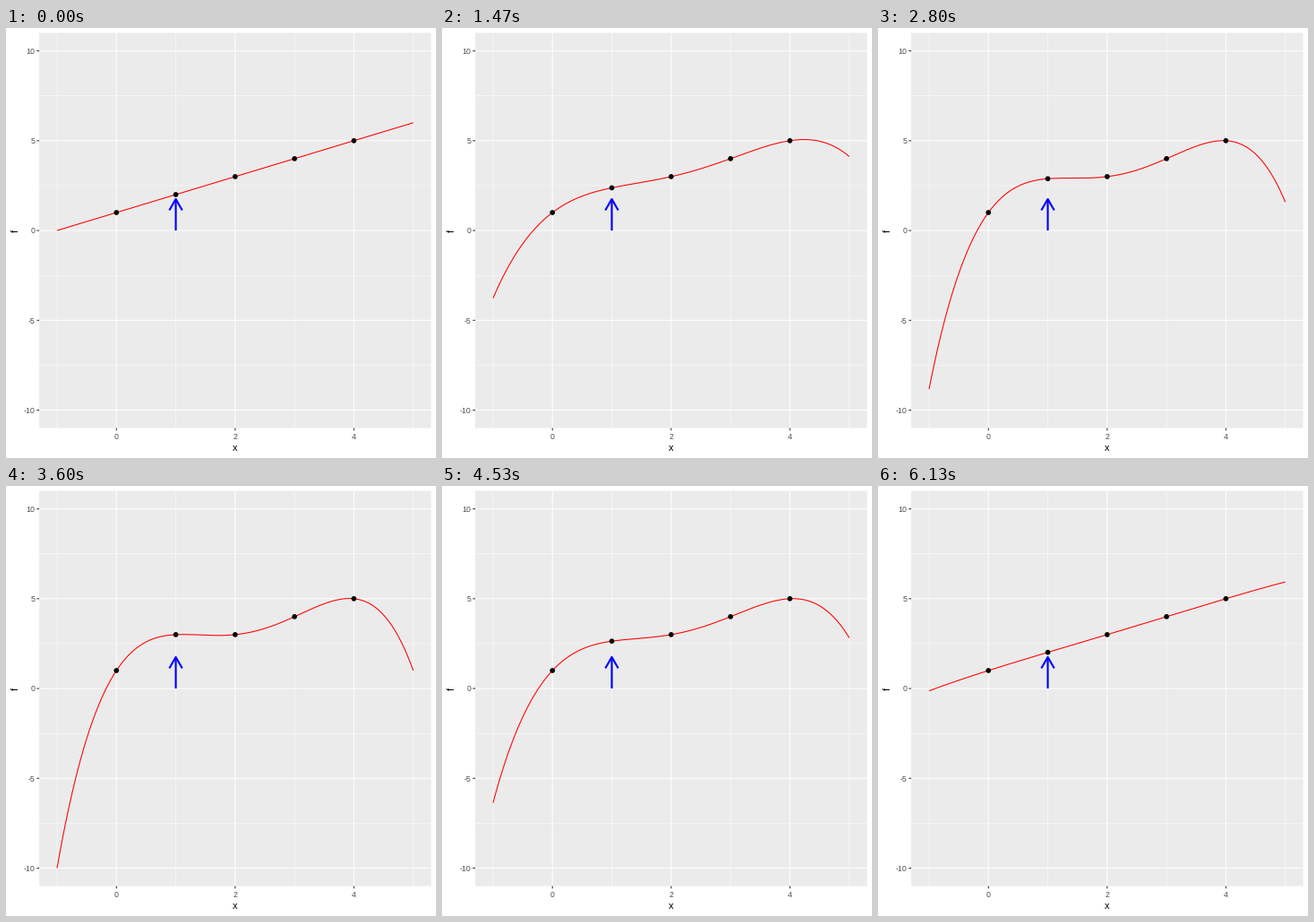
A matplotlib script for the animation above (6.67 s loop, 480 px wide and 480 px high).

```python
import numpy as np
import matplotlib.pyplot as plt
from matplotlib.animation import FuncAnimation
from matplotlib.patches import Circle, Rectangle

SIZE, DPI = 480, 100
FRAMES, LOOP_MS = 200, 6670
LEFT, RIGHT, TOP, BOTTOM = 37.1, 474.5, 5.5, 446.6
RISE_FROM, FALL_FROM, MOVE = 15, 107, 77
PT = 72 / DPI  # points per pixel

plt.rcParams["font.family"] = "Liberation Sans"


def px(x):
    return LEFT + (np.asarray(x) + 1.3) * (RIGHT - LEFT) / 6.6


def py(y):
    return TOP + (11 - np.asarray(y)) * (BOTTOM - TOP) / 22


fig = plt.figure(figsize=(SIZE / DPI, SIZE / DPI), dpi=DPI, facecolor="white")
ax = fig.add_axes([0, 0, 1, 1])
ax.set_xlim(0, SIZE)
ax.set_ylim(SIZE, 0)
ax.axis("off")


def stroke(xs, ys, color, width, z, **kw):
    line, = ax.plot(xs, ys, color=color, lw=width * PT, zorder=z, snap=False,
                    solid_capstyle="butt", solid_joinstyle="round", **kw)
    return line


def label(x, y, text, size, color, ha="center", **kw):
    ax.text(x, y, text, fontsize=size * PT, color=color, ha=ha,
            va="baseline", rotation_mode="anchor", **kw)


def draw_panel():
    ax.add_patch(Rectangle((LEFT, TOP), RIGHT - LEFT, BOTTOM - TOP,
                           fc="#EBEBEB", ec="none", zorder=0, snap=False))
    for x in (-1, 1, 3, 5):
        stroke([px(x)] * 2, [TOP, BOTTOM], "white", 0.53, 1)
    for y in (-7.5, -2.5, 2.5, 7.5):
        stroke([LEFT, RIGHT], [py(y)] * 2, "white", 0.53, 1)
    for x in (0, 2, 4):
        stroke([px(x)] * 2, [TOP, BOTTOM], "white", 1.07, 2)
        stroke([px(x)] * 2, [BOTTOM, BOTTOM + 2.74], "#333333", 1.07, 2)
        label(px(x), 459, str(x), 8.8, "#4D4D4D")
    for y in (-10, -5, 0, 5, 10):
        stroke([LEFT, RIGHT], [py(y)] * 2, "white", 1.07, 2)
        stroke([LEFT - 2.74, LEFT], [py(y)] * 2, "#333333", 1.07, 2)
        label(32.2, py(y) + 3.2, str(y), 8.8, "#4D4D4D", ha="right")
    label((LEFT + RIGHT) / 2, 472, "x", 11, "black")
    label(13.4, (TOP + BOTTOM) / 2, "f", 11, "black", rotation=90)


def draw_arrow():
    x, tip = px(1), py(1.75)
    stroke([x, x], [py(0), tip], "blue", 2.13, 5)
    stroke([x - 7.2, x, x + 7.2], [tip + 12.5, tip, tip + 12.5],
           "blue", 2.13, 5)


draw_panel()
draw_arrow()

xs = np.linspace(-1, 5, 241)
# Lagrange basis: 1 at x = 1, 0 at the other nodes
basis = -xs * (xs - 2) * (xs - 3) * (xs - 4) / 6
curve = stroke(px(xs), py(xs + 1), "red", 1.07, 3)
dots = [Circle((px(n), py(n + 1)), 2.84, fc="black", ec="none", zorder=4)
        for n in range(5)]
for dot in dots:
    ax.add_patch(dot)


def lift(frame):
    up = np.clip((frame - RISE_FROM) / MOVE, 0, 1)
    down = np.clip((frame - FALL_FROM) / MOVE, 0, 1)
    return up - down


def update(frame):
    d = lift(frame)
    curve.set_ydata(py(xs + 1 + d * basis))
    dots[1].center = (px(1), py(2 + d))
    return curve, dots[1]


anim = FuncAnimation(fig, update, frames=FRAMES, interval=LOOP_MS / FRAMES,
                     init_func=lambda: update(0), repeat=True, repeat_delay=0)
plt.show()
```
